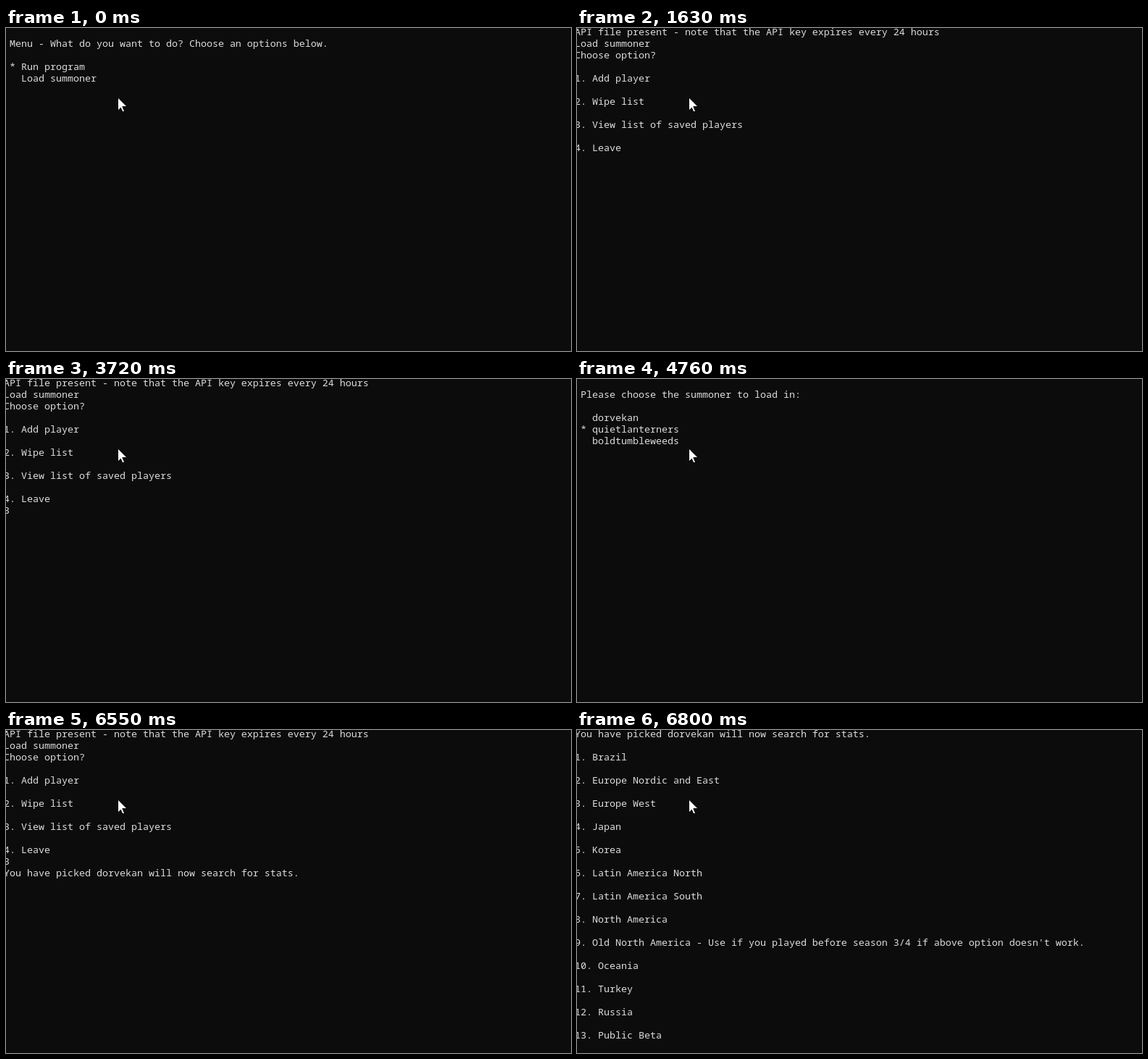
An HTML page with a canvas for the animation above (8 s loop, 780 px wide and 446 px high).

```html
<!DOCTYPE html>
<html lang="en">
<head>
<meta charset="utf-8">
<title>Console menu</title>
<style>
  html, body { margin: 0; width: 100%; height: 100%; overflow: hidden; background: #0c0c0c; }
  canvas { display: block; }
</style>
</head>
<body>
<canvas id="stage" width="780" height="446"></canvas>
<script>
// An opaque canvas allows subpixel text smoothing.
const ctx = document.getElementById("stage").getContext("2d", { alpha: false });
const LOOP = 8000, CELL = 8, LINE = 16, LEFT = -3, BASELINE = 10;
const players = ["dorvekan", "quietlanterners", "boldtumbleweeds"];
const picked = `You have picked ${players[0]} will now search for stats.`;
const regions = [
  "Brazil", "Europe Nordic and East", "Europe West", "Japan", "Korea",
  "Latin America North", "Latin America South", "North America",
  "Old North America - Use if you played before season 3/4 if above option doesn't work.",
  "Oceania", "Turkey", "Russia", "Public Beta"
];
const numbered = items => items.flatMap((item, i) => ["", `${i + 1}. ${item}`]);
const home = [
  "API file present - note that the API key expires every 24 hours",
  "Load summoner", "Choose option?",
  ...numbered(["Add player", "Wipe list", "View list of saved players", "Leave"])
];
const answered = [...home, "3"];
const results = [picked, ...numbered(regions)];

const picker = (title, items, selected) =>
  ["", " " + title, "", ...items.map((item, i) => (i === selected ? " * " : "   ") + item)];
const mainMenu = selected =>
  picker("Menu - What do you want to do? Choose an options below.", ["Run program", "Load summoner"], selected);
const playerMenu = selected => picker("Please choose the summoner to load in:", players, selected);

// [start time, lines, column of the visible text cursor]
const steps = [
  [0, mainMenu(0)], [590, mainMenu(1)], [790, mainMenu(0)], [1090, mainMenu(1)],
  [1630, home], [2120, home, 0], [2320, home], [2660, home, 0],
  [2810, home], [3160, home, 0], [3340, home],
  [3570, answered, 1], [3720, answered],
  [3900, playerMenu(0)], [4760, playerMenu(1)], [5260, playerMenu(2)],
  [5660, playerMenu(1)], [5940, playerMenu(0)],
  [6500, answered], [6550, [...answered, picked]],
  [6750, [...answered, ...results.slice(0, 15)]], [6800, results]
];
const pointer = new Path2D("M155 97V113L158.5 109.5L161 115H163L160.5 109V108H166Z");

function draw(now) {
  const time = now % LOOP;
  const [, lines, cursor] = steps.findLast(step => step[0] <= time);
  ctx.fillStyle = "#0c0c0c";
  ctx.fillRect(0, 0, 780, 446);
  ctx.font = "13.3333px 'Noto Sans Mono', monospace";
  ctx.fillStyle = "#ddd";
  lines.forEach((line, row) => ctx.fillText(line, LEFT, BASELINE + row * LINE));
  if (cursor !== undefined) {
    ctx.fillStyle = "#f3f3f3";
    ctx.fillRect(LEFT + cursor * CELL, 185, CELL, 4);
  }
  ctx.fillStyle = "#fff";
  ctx.fill(pointer);
  requestAnimationFrame(() => draw(performance.now()));
}
draw(0);
</script>
</body>
</html>
```
